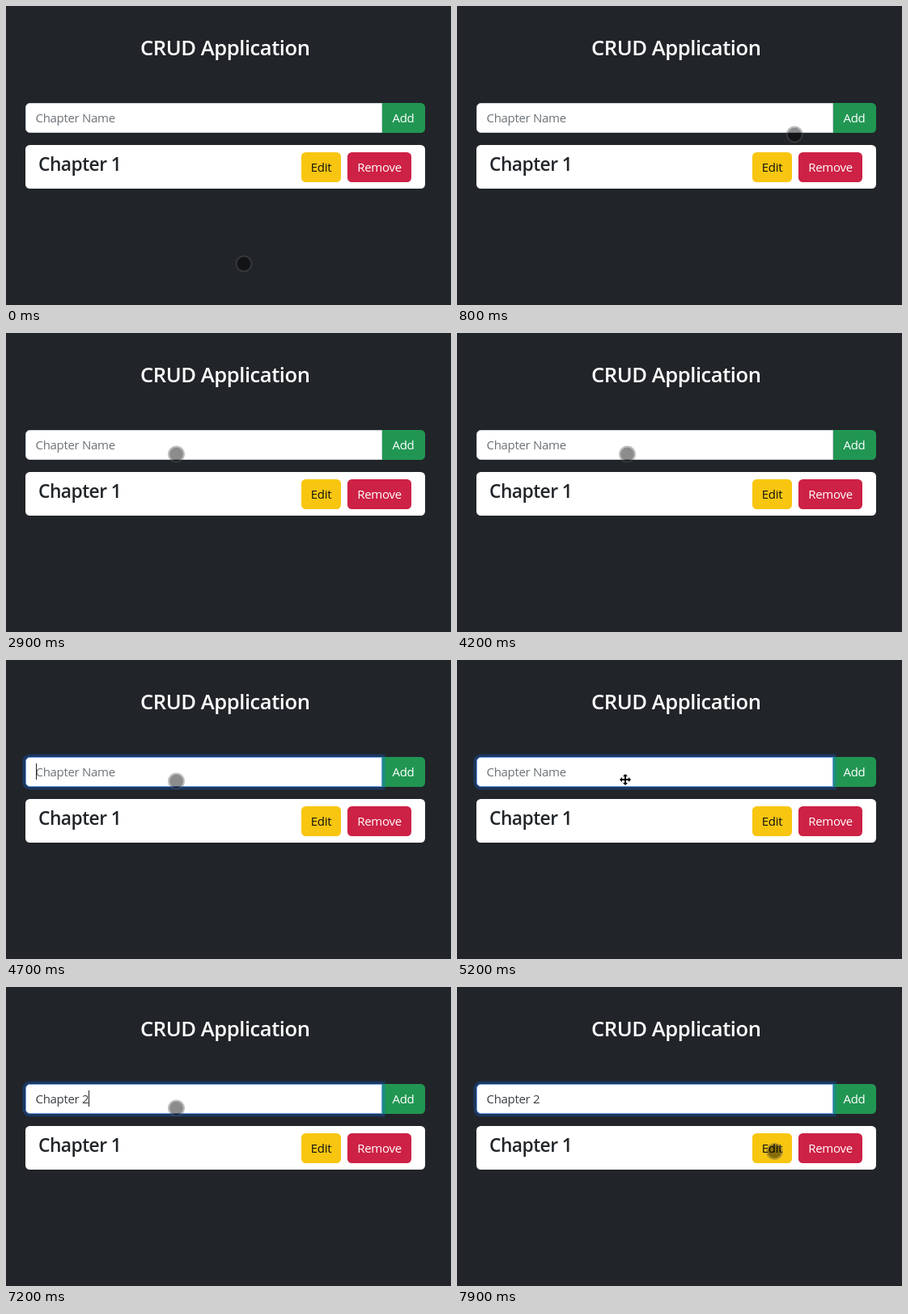
Recreate the animation shown at these times as an HTML page. Size 550x370 px, loop 8000 ms.

```html
<!DOCTYPE html>
<html lang="en">
<head>
<meta charset="utf-8">
<title>CRUD Application</title>
<style>
  html, body { margin: 0; width: 100%; height: 100%; overflow: hidden; background: #212529; }
  body { font: 15px "Open Sans", "Noto Sans", sans-serif; letter-spacing: -.3px; color: #212529; }
  #stage { position: relative; width: 550px; height: 370px; overflow: hidden; }
  #stage > * { position: absolute; box-sizing: border-box; white-space: pre; }
  h1, h2 { margin: 0; font-weight: 600; line-height: 40px; }
  h1 { left: 166px; top: 32px; font-size: 25.6px; letter-spacing: -.45px; color: #fff; }
  h2 { left: 40px; top: 176px; font-size: 22.8px; letter-spacing: -.55px; }
  .btn { height: 37px; line-height: 37px; border-radius: 5.5px; text-align: center; color: #fff; }
  #add { left: 464px; top: 120px; width: 54px; border-radius: 0 5.5px 5.5px 0; background: #219653; }
  #edit { left: 365px; top: 181px; width: 49px; background: #f8c610; color: #111; }
  #remove { left: 422px; top: 181px; width: 79px; background: #cd2145; }
  #card { left: 24px; top: 172px; width: 494px; height: 54px; border-radius: 5.5px; background: #fff; }
  #field {
    left: 24px; top: 120px; width: 441px; height: 37px; line-height: 35px;
    padding-left: 11.5px; border: 1px solid #ced4da; border-radius: 5.5px 0 0 5.5px;
    background: #fff; color: #3a3d41; z-index: 1;
  }
  #field.focus { border-color: #6d9fe6; box-shadow: 0 0 0 3.6px rgba(13, 110, 253, .25); }
  #hint { position: absolute; left: 11.5px; top: 0; color: #6c7277; }
  #caret { position: absolute; top: 7px; width: 1px; height: 20px; background: #222; }
  #dot {
    left: -11px; top: -11px; width: 21px; height: 21px; border-radius: 50%; z-index: 2;
    background: rgba(0, 0, 0, .45); background-clip: padding-box; border: 2px solid rgba(85, 85, 85, .4);
  }
  #cross { left: 199.5px; top: 139.5px; z-index: 2; }
</style>
</head>
<body>
<div id="stage">
  <h1>CRUD Application</h1>
  <div id="add" class="btn">Add</div>
  <div id="field"><span id="hint">Chapter Name</span><span id="typed"></span><span id="caret"></span></div>
  <div id="card"></div>
  <h2>Chapter 1</h2>
  <div id="edit" class="btn">Edit</div>
  <div id="remove" class="btn">Remove</div>
  <div id="dot"></div>
  <svg id="cross" width="16" height="16" viewBox="-8 -8 16 16">
    <path d="M0-7L3-4H1V-1H4V-3L7 0L4 3V1H1V4H3L0 7L-3 4H-1V1H-4V3L-7 0L-4-3V-1H-1V-4H-3Z"
      fill="#000" stroke="#fff" stroke-width="1" paint-order="stroke"/>
  </svg>
</div>
<script>
  const LOOP = 8000, STEP = 100, FOCUS = 4400, BLINK = 530;
  const CROSS = [5100, 5400];
  const TEXT = 'Chapter 2';
  const KEYS = [5500, 5600, 5800, 5900, 6000, 6100, 6200, 6700, 6900];
  // time, x, y of the pointer
  const PATH = [
    [0, 294.5, 319.5], [200, 294.5, 319.5], [900, 425, 150], [1300, 522, 11], [1800, 471.5, 17.5],
    [1900, 471.5, 17.5], [2600, 211, 150.5], [7200, 211, 150.5], [7700, 393, 204], [LOOP, 393, 204]
  ];
  const $ = id => document.getElementById(id);
  const [field, hint, typed, caret, dot, cross] =
    ['field', 'hint', 'typed', 'caret', 'dot', 'cross'].map($);
  const show = (el, on) => { el.style.visibility = on ? 'visible' : 'hidden'; };

  function pointer(t) {
    const i = PATH.findIndex(p => p[0] > t);
    const [t0, x0, y0] = PATH[i - 1], [t1, x1, y1] = PATH[i];
    const u = (t - t0) / (t1 - t0), e = u * u * (3 - 2 * u);
    return [x0 + (x1 - x0) * e, y0 + (y1 - y0) * e];
  }

  function draw(t) {
    const count = KEYS.filter(k => k <= t).length;
    const since = t - (count ? KEYS[count - 1] : FOCUS);
    const moving = t >= CROSS[0] && t < CROSS[1];
    const [x, y] = pointer(t);
    field.classList.toggle('focus', t >= FOCUS);
    typed.textContent = TEXT.slice(0, count);
    show(hint, !count);
    show(caret, since >= 0 && since % (2 * BLINK) < BLINK);
    show(dot, !moving);
    show(cross, moving);
    dot.style.transform = `translate(${x}px, ${y}px)`;
  }

  const start = performance.now();
  function tick() {
    const t = (performance.now() - start) % LOOP;
    draw(Math.floor(t / STEP) * STEP);
    requestAnimationFrame(tick);
  }
  draw(0);
  requestAnimationFrame(tick);
</script>
</body>
</html>
```
